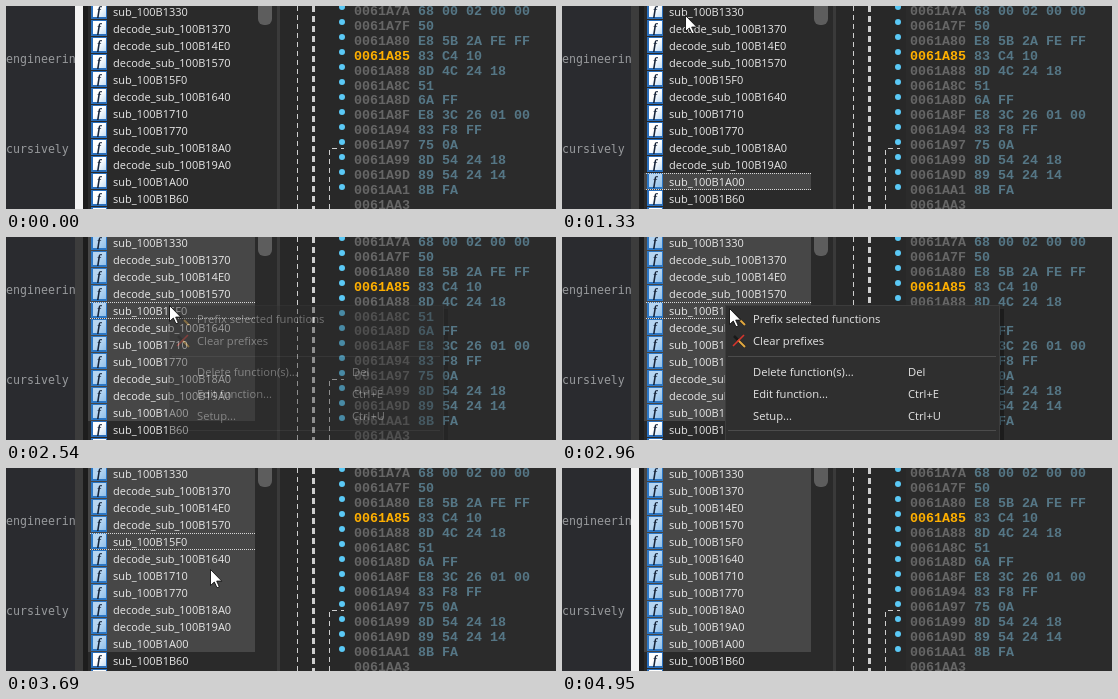
An HTML page that plays this animation: 550x203 px, repeating every 6030 ms.

```html
<!DOCTYPE html>
<html lang="en">
<head>
<meta charset="utf-8">
<style>
html, body { margin: 0; width: 100%; height: 100%; overflow: hidden; background: #2b2b2b; }
svg { display: block; width: 550px; height: 203px; }
text { white-space: pre; }
.note { font: 11.6px "DejaVu Sans Mono", monospace; fill: #989a9d; }
.name { font: 11px "Open Sans", sans-serif; fill: #e8e8e8; }
.menu { font: 11.2px "Open Sans", sans-serif; fill: #e4e4e4; }
.hex { font: bold 13.33px "Liberation Mono", monospace; fill: #557685; }
.addr { fill: #666; }
.here { fill: #ffb000; }
.glyph { font: italic bold 12px "Liberation Serif", serif; fill: #16243a; text-anchor: middle; }
.dash { fill: none; stroke: #cfcfcf; stroke-dasharray: 5 4; }
.focus { fill: none; stroke: #d8d8d8; stroke-dasharray: 1 1; }
</style>
</head>
<body>
<svg viewBox="0 0 550 203">
  <defs>
    <linearGradient id="paper" x2="1" y2="1">
      <stop offset=".45" stop-color="#fff"/><stop offset="1" stop-color="#c4def5"/>
    </linearGradient>
  </defs>
  <rect width="69" height="203" fill="#2a2b2f"/>
  <text class="note" x="0" y="57">engineerin</text>
  <text class="note" x="0" y="147">cursively</text>
  <rect id="splitter" x="69" width="8" height="203"/>
  <rect x="77" width="194" height="203" fill="#2a2a2a"/>
  <rect x="77" width="5" height="203" fill="#1d1d1d"/>
  <g id="list"></g>
  <path id="focus" class="focus"/>
  <rect x="252" y="-10" width="14" height="29" rx="6" fill="#5d5d5d"/>
  <rect x="271" width="3" height="203" fill="#3a3a3a"/>
  <rect x="274" width="70" height="203" fill="#282828"/>
  <path class="dash" d="M291.5 0V203M323.5 203V142.5H338"/>
  <path class="dash" d="M307.5 0V203" stroke-width="3" style="stroke-dasharray:6 4"/>
  <g id="dots" fill="#5ac8f5"></g>
  <g id="hex"></g>
  <g id="menu">
    <rect x="166" y="72" width="276" height="140" fill="#000" opacity=".35"/>
    <rect x="163.5" y="68.5" width="274" height="150" fill="#2f2f2f" stroke="#3c3c3c"/>
    <path d="M166 119.5H434M166 193.5H434" stroke="#4c4c4c"/>
    <path d="M172 77l11 11M172 99l11 11" stroke="#191919" stroke-width="2.5"/>
    <path d="M178 83l5 5M176 103l7 7" stroke="#e0a840" stroke-width="2"/>
    <path d="M171 109l11-11" stroke="#d8342c" stroke-width="1.6"/>
    <g id="items"></g>
  </g>
  <path id="cursor" d="M.5.5V16.5L4.3 13 7 18.8 9.3 17.8 6.7 12.1H11.8Z" fill="#fff" stroke="#111" stroke-width=".9"/>
</svg>
<script>
const LOOP = 6030;
const $ = id => document.getElementById(id);
const label = (cls, x, y, s) => `<text class="${cls}" x="${x}" y="${y}">${s}</text>`;

const codes = "1330 1370 14E0 1570 15F0 1640 1710 1770 18A0 19A0 1A00 1B60 1C20".split(" ");
const prefixed = new Set(["1370", "14E0", "1570", "1640", "18A0", "19A0"]);
const rowTop = row => 17 * row - 3;

$("list").innerHTML = codes.map((code, row) => `<g transform="translate(0 ${rowTop(row)})">
  <rect class="band" x="82" width="167" height="17" fill="#474747"/>
  <rect x="85" width="16" height="16" fill="#2b6fbb"/>
  <rect x="87" y="1" width="13" height="13" fill="url(#paper)"/>
  <rect class="band" x="85" width="16" height="16" fill="#2f86d6" opacity=".35"/>
  ${label("glyph", 93, 12, "f")}${label("name", 107, 13, "")}</g>`).join("");
const rows = [...$("list").children].map(g => ({
  bands: g.querySelectorAll(".band"), name: g.querySelector(".name")
}));

const code = [
  ["7A", "68 00 02 00 00"], ["7F", "50"], ["80", "E8 5B 2A FE FF"], ["85", "83 C4 10"],
  ["88", "8D 4C 24 18"], ["8C", "51"], ["8D", "6A FF"], ["8F", "E8 3C 26 01 00"],
  ["94", "83 F8 FF"], ["97", "75 0A"], ["99", "8D 54 24 18"], ["9D", "89 54 24 14"],
  ["A1", "8B FA"], ["A3", ""]
];
$("hex").innerHTML = code.map(([address, bytes], i) => {
  const y = Math.round(9 + 14.9 * i);
  return label("hex " + (address === "85" ? "here" : "addr"), 348, y, "0061A" + address) + label("hex", 412, y, bytes);
}).join("");
$("dots").innerHTML = Array.from({ length: 13 }, (_, i) => `<circle cx="336" cy="${1 + 15 * i}" r="3"/>`).join("");

$("items").innerHTML = [
  [82, "Prefix selected functions", ""], [104, "Clear prefixes", ""],
  [135, "Delete function(s)...", "Del"], [157, "Edit function...", "Ctrl+E"], [179, "Setup...", "Ctrl+U"]
].map(([y, s, key]) => label("menu", 191, y + 4, s) + label("menu", 346, y + 4, key)).join("");
const [prefixItem, , clearItem] = $("items").children;

// Cursor moves: start, end, number of steps, from, to
const moves = [
  [490, 770, 5, [226, 203], [193, 182]],
  [1100, 1330, 6, [193, 182], [123, 9]],
  [2120, 2220, 3, [123, 9], [163, 68]],
  [2960, 3450, 10, [163, 68], [204, 101]],
  [4020, 4120, 3, [204, 101], [313, 172]]
];
// The slack absorbs frame times rounded to 10 ms
const stepped = (t, start, end, n) =>
  Math.min(n, Math.floor((t - start) / (end - start) * (n - 1) + 0.15) + 1) / n;

function cursorAt(t) {
  if (t < 490 || t >= 4170) return null;
  const [start, end, n, from, to] = moves.findLast(m => t >= m[0]);
  const p = stepped(t, start, end, n);
  return from.map((v, i) => Math.round(v + (to[i] - v) * p));
}

function focusAt(t) {
  if (t < 770 || t >= 4950) return -1;
  if (t < 1700) return 10;
  if (t < 2410) return 0;
  return t < 3830 ? 4 : 10;
}

const menuOpacity = t => t < 2500 || t >= 3690 ? 0 : stepped(t, 2500, 2680, 5);

function draw(t) {
  rows.forEach(({ bands, name }, row) => {
    const selected = t >= 1700 ? row < 11 : t >= 840 && row === 10;
    bands.forEach(b => b.style.display = selected ? "" : "none");
    const prefix = t < 3830 && prefixed.has(codes[row]) ? "decode_" : "";
    name.textContent = prefix + "sub_100B" + codes[row];
  });

  $("splitter").setAttribute("fill", t < 490 || t >= 4950 ? "#f3f3f3" : "#3c3c3c");

  const row = focusAt(t), y = rowTop(row) + 0.5;
  $("focus").setAttribute("d", row < 0 ? "" : `M84 ${y}H249M84 ${y + 16}H249`);

  const pos = cursorAt(t);
  $("cursor").style.display = pos ? "" : "none";
  if (pos) $("cursor").setAttribute("transform", `translate(${pos})`);

  $("menu").setAttribute("opacity", menuOpacity(t));
  const tip = pos && t >= 2960 ? pos[1] : 0;
  prefixItem.style.fill = tip > 72 && tip < 93 ? "#fff" : "";
  clearItem.style.fill = tip >= 93 ? "#fff" : "";
}

const began = performance.now();
function tick() {
  draw((performance.now() - began) % LOOP);
  requestAnimationFrame(tick);
}
tick();
</script>
</body>
</html>
```
